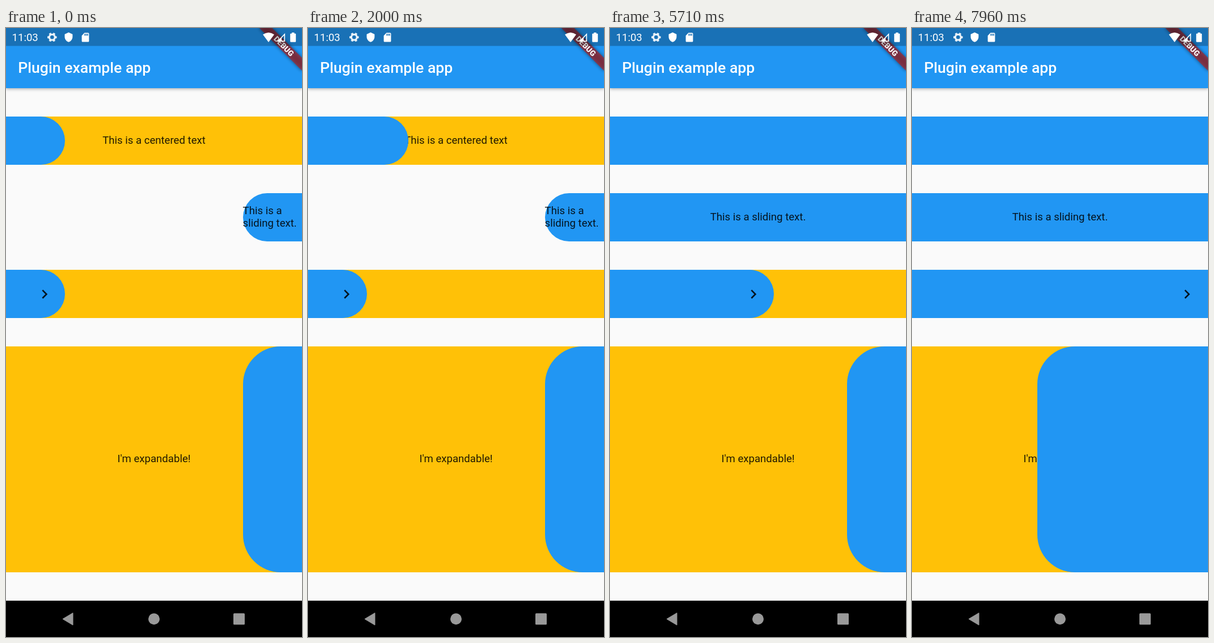
Animation of 522 by 1073 pixels, one loop 8000 ms. Source, as an HTML page:

```html
<!DOCTYPE html>
<html lang="en">
<head>
<meta charset="utf-8">
<title>Sliding containers</title>
<style>
  html, body { margin: 0; width: 100%; height: 100%; overflow: hidden; }
  body { position: relative; background: #fafafa; color: rgba(0, 0, 0, .87); font: 18.6px/21.5px Roboto, sans-serif; }
  .bar { position: absolute; inset: 0 0 auto; height: 106.3px; background: #2196f3; box-shadow: 0 2px 5px rgba(0, 0, 0, .28); }
  .row { position: absolute; left: 0; width: 522px; height: 85px; overflow: hidden; display: flex; align-items: center; justify-content: center; }
  .amber { background: #ffc107; }
  .slider { position: absolute; top: 0; height: 100%; background: #2196f3; display: flex; align-items: center; justify-content: center; }
  .chevron { position: absolute; right: 20.9px; top: 26.5px; width: 31.9px; height: 31.9px; }
  .chrome { position: absolute; left: 0; top: 0; }
</style>
</head>
<body>
<div class="bar"></div>

<div class="row amber" style="top:156px"><span>This is a centered text</span><div class="slider"></div></div>
<div class="row" style="top:291px"><div class="slider"><span>This is a sliding text.</span></div></div>
<div class="row amber" style="top:426px">
  <div class="slider">
    <svg class="chevron" viewBox="0 0 24 24"><path d="M10 6L8.59 7.41 13.17 12l-4.58 4.59L10 18l6-6z" fill="#000" fill-opacity=".87"/></svg>
  </div>
</div>
<div class="row amber" style="top:560.7px;height:398.7px"><span>I'm expandable!</span><div class="slider"></div></div>

<svg class="chrome" width="522" height="1073" font-family="Roboto, sans-serif" fill="#fff">
  <defs>
    <filter id="soft" x="-20%" y="-80%" width="140%" height="260%"><feGaussianBlur stdDeviation="3"/></filter>
  </defs>
  <text x="21.3" y="79" font-size="26.58" font-weight="500">Plugin example app</text>

  <!-- Corner ribbon -->
  <g transform="translate(522 0) rotate(45)">
    <rect x="-53.2" y="37.2" width="106.4" height="16" fill="#000" fill-opacity=".5" filter="url(#soft)"/>
    <rect x="-53.2" y="37.2" width="106.4" height="16" fill="#b71c1c" fill-opacity=".627"/>
    <text y="50" font-size="13.56" font-weight="900" text-anchor="middle">DEBUG</text>
  </g>

  <!-- Status bar -->
  <rect width="522" height="31.6" fill="#000" fill-opacity=".25"/>
  <text x="10.5" y="23" font-size="18.6">11:03</text>
  <g transform="translate(81.3 16.3)" fill="none" stroke="#fff" stroke-opacity=".9">
    <circle r="4.9" stroke-width="3.2"/>
    <circle r="7.1" stroke-width="2.4" pathLength="12" stroke-dasharray="1 1" stroke-dashoffset=".5"/>
  </g>
  <path transform="translate(101.2 7.1) scale(.77)" d="M12 1L3 5v6c0 5.55 3.84 10.74 9 12 5.16-1.26 9-6.45 9-12V5z"/>
  <path transform="translate(130.4 7) scale(.8)" d="M18 2h-8L4 8v12c0 1.1.9 2 2 2h12c1.1 0 2-.9 2-2V4c0-1.1-.9-2-2-2zm-6 6h-2V4h2zm3 0h-2V4h2zm3 0h-2V4h2z"/>
  <path d="M463 25L453 11.6Q463 4.6 473 11.6Z"/>
  <path d="M479.5 23.2L491.3 11V23.2Z" fill="none" stroke="#fff" stroke-width="1.6"/>
  <path d="M478.5 24L486 16.5V24Z"/>
  <path d="M504 8h4.4v1.8h1.6q1.2 0 1.2 1.2v12.6q0 1.2-1.2 1.2h-7.6q-1.2 0-1.2-1.2V11q0-1.2 1.2-1.2h1.6z"/>

  <!-- Navigation bar -->
  <rect y="1009" width="522" height="64" fill="#000"/>
  <g fill="#999">
    <path d="M100 1041.3L118 1030.6V1052Z" stroke="#999" stroke-linejoin="round"/>
    <circle cx="261" cy="1041.2" r="10"/>
    <rect x="401" y="1031.2" width="20" height="20" rx="1.5"/>
  </g>
</svg>

<script>
const LOOP = 8000, FULL = 522, CLOSED = 104.4, RADIUS = 66.4;

// Each drag is a list of [time in ms, slider width].
const drags = [
  { side: 'left', keys: [[1650, CLOSED], [2350, 300], [3090, 520], [3130, FULL]] },
  { side: 'right', keys: [[3400, CLOSED], [4130, 427], [4450, FULL]] },
  { side: 'left', keys: [[5100, CLOSED], [5710, 289], [6380, 474], [6560, FULL]] },
  { side: 'right', keys: [[7250, CLOSED], [7960, 301], [8400, 420]] }
];
const sliders = [...document.querySelectorAll('.slider')];
const clamp = (v, lo, hi) => Math.min(hi, Math.max(lo, v));

function slope(keys, i) {
  return (keys[i + 1][1] - keys[i][1]) / (keys[i + 1][0] - keys[i][0]);
}

// The harmonic mean of neighbouring slopes keeps the curve monotone.
function tangent(keys, i) {
  if (i === 0 || i === keys.length - 1) return 0;
  const a = slope(keys, i - 1), b = slope(keys, i);
  return 2 * a * b / (a + b);
}

function widthAt(keys, t) {
  const last = keys.length - 1;
  if (t <= keys[0][0]) return keys[0][1];
  if (t >= keys[last][0]) return keys[last][1];
  const i = keys.findIndex(k => k[0] > t) - 1;
  const [t0, w0] = keys[i], [t1, w1] = keys[i + 1];
  const d = t1 - t0, u = (t - t0) / d, v = 1 - u;
  return w0 * (1 + 2 * u) * v * v + w1 * u * u * (3 - 2 * u)
    + d * u * v * (tangent(keys, i) * v - tangent(keys, i + 1) * u);
}

function draw(t) {
  drags.forEach(({ side, keys }, i) => {
    const w = widthAt(keys, t);
    const limit = sliders[i].parentNode.clientHeight / 2;
    const r = Math.min(limit, RADIUS * clamp((486 - w) / 68, 0, 1));
    const style = sliders[i].style;
    style[side] = 0;
    style.width = w + 'px';
    style.borderRadius = side === 'left' ? `0 ${r}px ${r}px 0` : `${r}px 0 0 ${r}px`;
  });
}

function tick(now) {
  draw(now % LOOP);
  requestAnimationFrame(tick);
}
draw(0);
requestAnimationFrame(tick);
</script>
</body>
</html>
```
